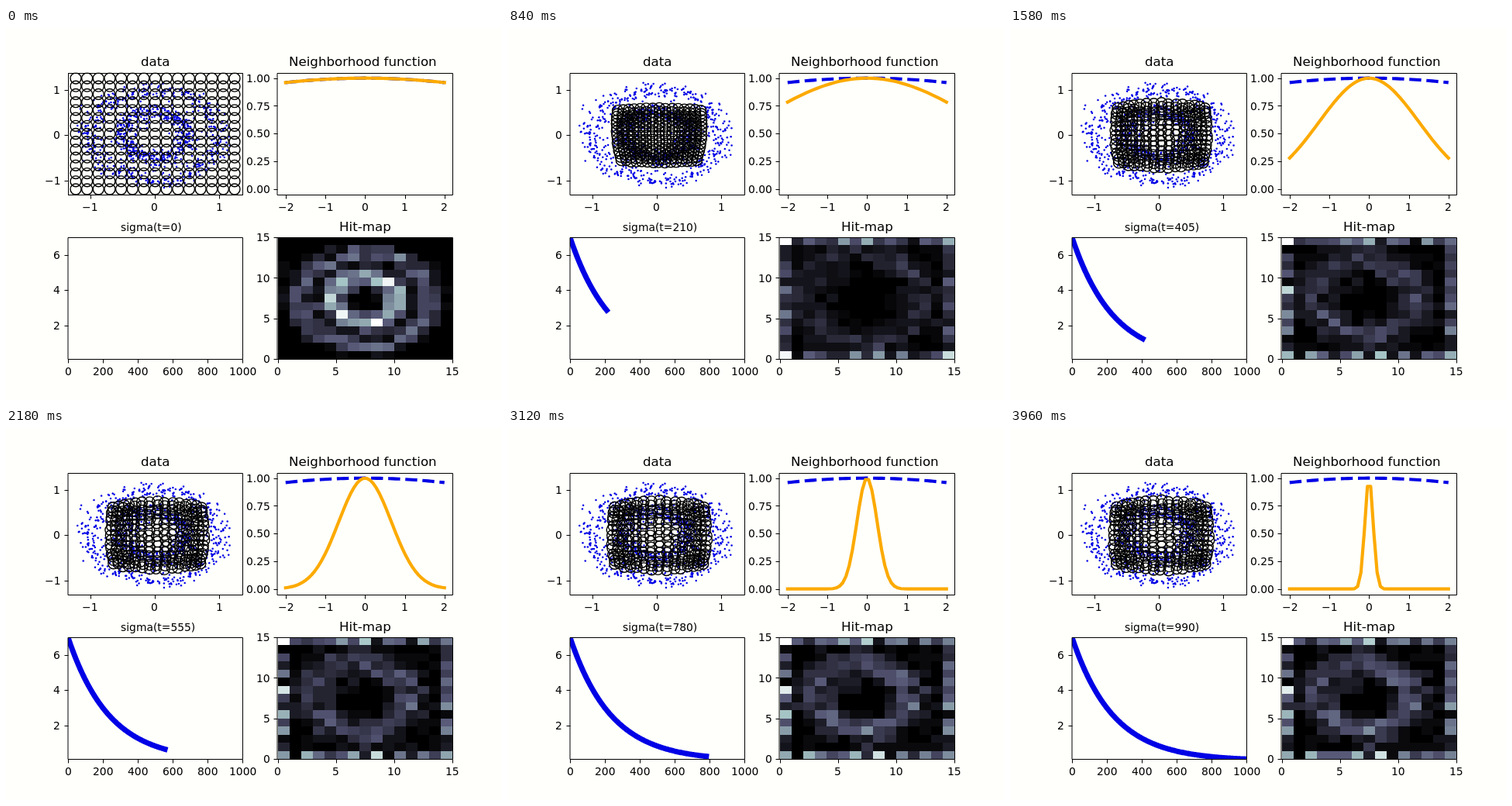
An HTML page with a canvas for the animation above (4060 ms loop, 640 px wide and 480 px high).

```html
<!DOCTYPE html>
<html lang="en">
<head>
<meta charset="utf-8">
<title>Self-organizing map</title>
<style>
  html, body { margin: 0; width: 100%; height: 100%; overflow: hidden; background: #fffffb; }
  canvas { display: block; }
</style>
</head>
<body>
<canvas id="stage" width="640" height="480"></canvas>
<script>
const ctx = document.getElementById('stage').getContext('2d');
const LOOP = 4060, SIZE = 15, W = 225.45, H = 157.28;
const LEFT = 80, RIGHT = 350.55, TOP = 57.6, BOTTOM = 269.93;
const BLUE = '#0000e6', ORANGE = '#fcaa00', PAPER = '#fffffb';
const clamp = v => Math.max(0, Math.min(1, v));
const mix = (a, b, amount) => a + (b - a) * amount;

// Seeded noise
let seed = 11;
function random() {
  seed = (seed + 0x6D2B79F5) | 0;
  let r = Math.imul(seed ^ (seed >>> 15), 1 | seed);
  r = (r + Math.imul(r ^ (r >>> 7), 61 | r)) ^ r;
  return ((r ^ (r >>> 14)) >>> 0) / 4294967296;
}
const gauss = () => Math.sqrt(-2 * Math.log(1 - random())) * Math.cos(2 * Math.PI * random());

// Two noisy rings, in stage pixels
const data = Array.from({ length: 1000 }, (_, i) => {
  const angle = i / 500 * 2 * Math.PI, radius = i < 500 ? 1 : 0.5;
  return [
    192 + 83.3 * (radius * Math.cos(angle) + 0.1 * gauss()),
    138 - 58.5 * (radius * Math.sin(angle) + 0.1 * gauss())
  ];
});
const jitter = Array.from({ length: SIZE * SIZE }, () => [gauss(), gauss()]);

// The regular grid contracts until t = 120, then slowly unfolds over the rings
function nodesAt(t) {
  const regular = (1 - clamp(t / 120)) ** 1.5;
  const grown = 1 - Math.exp(-Math.max(0, t - 120) / 180);
  const loose = 0.7 * clamp(t / 500);
  const spread = s => s + 0.08 * grown * Math.sin(Math.PI * s);
  return jitter.map(([jx, jy], k) => {
    const column = k % SIZE / 7 - 1, row = Math.floor(k / SIZE) / 7 - 1;
    const u = spread(column), v = spread(row);
    const x = 195 + (47 + 10 * grown) * u * (1 + 0.07 * (1 - v * v)) + 4 * (1 - grown) * u * v;
    const y = 138.5 - (29 + 8 * grown) * v * (1 + 0.2 * grown * (1 - u * u));
    return [
      mix(x, 192.5 + 102.5 * column, regular) + jx * loose,
      mix(y, 136.5 - 71.5 * row, regular) + jy * loose
    ];
  });
}

function countHits(nodes) {
  const hits = nodes.map(() => 0);
  for (const [px, py] of data) {
    let best = Infinity, winner = 0;
    nodes.forEach(([x, y], k) => {
      const d = ((x - px) / 83.3) ** 2 + ((y - py) / 58.5) ** 2;
      if (d < best) { best = d; winner = k; }
    });
    hits[winner]++;
  }
  return hits;
}

// Grey with a blue tint: blue rises first, then green, then red
function shade(v) {
  const tint = [(v - 0.75) / 0.25, (v - 0.375) / 0.375, v / 0.375];
  return `rgb(${tint.map(c => Math.round(255 * (7 * v + clamp(c)) / 8))})`;
}

const sigma = t => 7 * (0.1 / 7) ** (t / 1000);

// Align: 0 left, 0.5 centre, 1 right; text starts on a whole pixel
function text(string, x, y, size = 13.89, align = 0.5) {
  ctx.font = `${size}px "DejaVu Sans", sans-serif`;
  ctx.fillStyle = '#000';
  ctx.fillText(string, Math.round(x - align * ctx.measureText(string).width), Math.round(y));
}

function line(points, color, width, dash = []) {
  ctx.beginPath();
  points.forEach(([x, y]) => ctx.lineTo(x, y));
  ctx.strokeStyle = color;
  ctx.lineWidth = width;
  ctx.lineCap = dash.length ? 'butt' : 'square';
  ctx.lineJoin = 'round';
  ctx.setLineDash(dash);
  ctx.stroke();
  ctx.setLineDash([]);
}

// Ticks are pairs of label and position
function panel(x, y, xTicks, yTicks, draw) {
  ctx.save();
  ctx.beginPath();
  ctx.rect(x, y, W, H);
  ctx.clip();
  draw();
  ctx.restore();
  const l = Math.floor(x) + 0.5, t = Math.round(y) + 0.5;
  const r = Math.round(x + W) + 0.5, b = Math.round(y + H) + 0.5;
  ctx.strokeStyle = '#000';
  ctx.lineWidth = 1;
  ctx.strokeRect(l, t, r - l, b - t);
  for (const [label, p] of xTicks) {
    const at = Math.round(p) + 0.5;
    line([[at, b + 0.5], [at, b + 4.5]], '#000', 1);
    text(label, p, y + H + 21);
  }
  for (const [label, p] of yTicks) {
    const at = Math.round(p) + 0.5;
    line([[l - 0.5, at], [l - 4.5, at]], '#000', 1);
    text(label, x - 9.7, p + 5.2, 13.89, 1);
  }
}
const ticks = (labels, start, step) => labels.map((label, i) => [label, start + i * step]);

function drawMap(nodes) {
  ctx.fillStyle = BLUE;
  for (const [x, y] of data) {
    ctx.beginPath();
    ctx.arc(x, y, 1.25, 0, 7);
    ctx.fill();
  }
  ctx.strokeStyle = '#000';
  ctx.lineWidth = 1.39;
  for (const [x, y] of nodes) {
    ctx.beginPath();
    ctx.arc(x, y, 6.95, 0, 7);
    ctx.stroke();
  }
}

function drawNeighborhood(t) {
  const bell = s => Array.from({ length: 50 }, (_, i) => {
    const d = -2 + 4 * i / 49;
    return [463.27 + 51.24 * d, 207.7 - 143 * Math.exp(-d * d / (2 * s * s))];
  });
  line(bell(7), BLUE, 4.17, [15.4, 6.7]);
  line(bell(sigma(t)), ORANGE, 4.17);
}

function drawSigma(t) {
  if (!t) return;
  const curve = Array.from({ length: t / 5 + 1 }, (_, i) =>
    [LEFT + i * 5 * W / 1000, BOTTOM + (7 - sigma(i * 5)) * H / 6.9]);
  line(curve, BLUE, 6.94);
}

function drawHits(nodes) {
  const hits = countHits(nodes), most = Math.max(...hits);
  const column = i => Math.round(RIGHT + i * W / SIZE);
  const row = j => Math.round(BOTTOM + H - j * H / SIZE);
  hits.forEach((n, k) => {
    const i = k % SIZE, j = Math.floor(k / SIZE);
    ctx.fillStyle = shade(n / most);
    ctx.fillRect(column(i), row(j + 1), column(i + 1) - column(i), row(j) - row(j + 1));
  });
}

function draw(t) {
  const nodes = nodesAt(t);
  ctx.fillStyle = PAPER;
  ctx.fillRect(0, 0, 640, 480);
  text('data', 193, 49, 16.67);
  text('Neighborhood function', 460.6, 49, 16.67);
  text(`sigma(t=${t})`, 147.5, 262, 13.89, 0);
  text('Hit-map', 463.3, 262, 16.67);
  panel(LEFT, TOP, ticks(['−1', '0', '1'], 108.5, 83.3), ticks(['1', '0', '−1'], 79.5, 58.5),
    () => drawMap(nodes));
  panel(RIGHT, TOP, ticks(['−2', '−1', '0', '1', '2'], 360.8, 51.24),
    ticks(['1.00', '0.75', '0.50', '0.25', '0.00'], 64.7, 35.75), () => drawNeighborhood(t));
  panel(LEFT, BOTTOM, ticks([0, 200, 400, 600, 800, 1000], LEFT, W / 5),
    ticks([6, 4, 2], 292.7, 45.59), () => drawSigma(t));
  panel(RIGHT, BOTTOM, ticks([0, 5, 10, 15], RIGHT, W / 3),
    ticks([15, 10, 5, 0], BOTTOM, H / 3), () => drawHits(nodes));
}

// Each pair of steps lasts 20 + 100 ms
const stepAt = ms => 2 * Math.floor(ms / 120) + (ms % 120 >= 20 && ms < 3960 ? 1 : 0);
let shown = -1;
function tick() {
  const step = stepAt(performance.now() % LOOP);
  if (step !== shown) draw(15 * (shown = step));
  requestAnimationFrame(tick);
}
tick();
</script>
</body>
</html>
```
